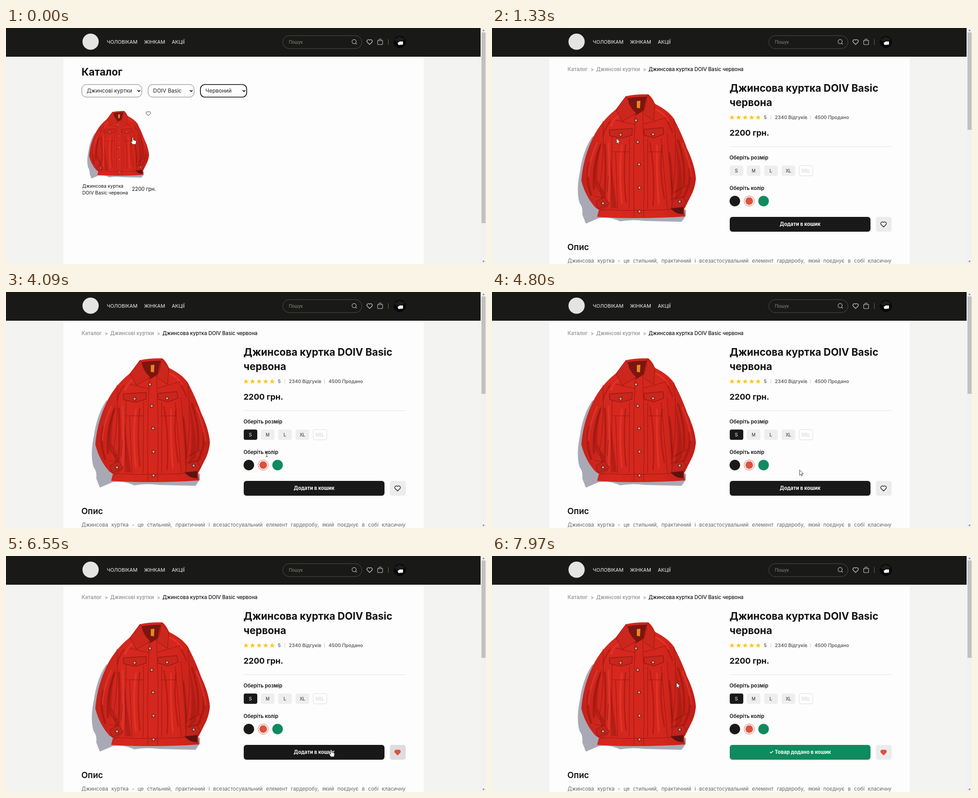
Recreate the animation shown at these times as an HTML page. Size 1064 px wide and 526 px high, loop 8000 ms.

```html
<!DOCTYPE html>
<html lang="uk">
<head>
<meta charset="utf-8">
<title>Каталог</title>
<style>
html, body { margin: 0; width: 100%; height: 100%; overflow: hidden; background: #f3f3f2; }
svg { display: block; width: 100vw; height: 100vh; }
text { font-family: Inter, sans-serif; fill: #111; white-space: pre; }
.nav text { font-size: 11px; fill: #f4f4f4; }
.icon { fill: none; stroke: #c9c9c9; stroke-width: 1.1; }
.select rect { fill: #fdfdfd; stroke: #77777a; height: 28px; rx: 10px; }
.select text { font-size: 12px; fill: #222; }
.select path { fill: none; stroke: #000; stroke-width: 1.7; }
.h1 { font-size: 22.4px; font-weight: 700; }
.crumb { font-size: 11.2px; font-weight: 600; }
.muted { fill: #999; }
.rating text { font-size: 10.5px; font-weight: 600; fill: #606060; }
.label { font-size: 11.3px; font-weight: 600; }
.size rect { width: 30px; height: 23px; rx: 4px; fill: #eee; }
.size text { font: 10px "Liberation Sans", Arial, sans-serif; text-anchor: middle; fill: #222; }
.button { font-size: 11.1px; font-weight: 700; text-anchor: middle; fill: #fff; }
.about { font: 11.5px/17px Inter, sans-serif; color: #666; text-align-last: justify; }
.seam { fill: none; stroke: #8f1a13; stroke-width: 1; }
.fold { fill: none; stroke: #8c120c; stroke-linecap: round; opacity: .45; }
.sheen { fill: none; stroke: #ef4436; stroke-linecap: round; opacity: .45; }
</style>
</head>
<body>
<svg viewBox="0 0 1064 526" preserveAspectRatio="none">
  <defs>
    <path id="heart" d="M0 5L-4.6 .4A2.95 2.95 0 0 1 0-3.2A2.95 2.95 0 0 1 4.6 .4Z"/>
    <path id="star" d="M0-5.5 1.6-1.9 5.4-1.6 2.5 .9 3.4 4.7 0 2.6-3.4 4.7-2.5 .9-5.4-1.6-1.6-1.9Z" fill="#ffc51c"/>
    <g id="stud"><circle r="3.8" fill="#6c1511"/><circle r="2.4" fill="#c9a9a0"/></g>
    <linearGradient id="cloth">
      <stop offset="0" stop-color="#c4221a"/><stop offset=".25" stop-color="#d6281e"/>
      <stop offset=".7" stop-color="#d4261c"/><stop offset="1" stop-color="#be2018"/>
    </linearGradient>
    <g id="jacket">
      <path fill="#a9a9b6" d="M224 240Q202 270 195 320Q186 362 194 390Q202 400 200 415L208 436 236 424Q262 420 284 431Q310 426 340 430L420 432 430 418V405H240Z"/>
      <path fill="url(#cloth)" d="M297 152Q322 147 347 148Q357 157 361 169Q391 184 403 202Q420 234 432 268Q450 306 452 336Q450 358 440 376L426 404 428 420Q330 427 233 421L237 405 230 401Q207 376 198 340Q202 286 228 236Q246 204 275 181Z"/>
      <path fill="#a01a13" opacity=".6" d="M244 250Q230 310 234 350L248 379 228 350Q220 300 244 250ZM406 250Q424 310 421 370L404 386Q418 330 406 250ZM244 350L252 398 240 402ZM262 285L277 402H266Z"/>
      <g class="fold" stroke-width="5">
        <path d="M240 262Q222 310 226 358M216 300Q206 335 220 372M412 250Q430 300 425 350M438 315Q442 345 425 376M250 260Q254 320 249 378M393 280Q400 330 399 372"/>
        <path stroke-width="3" d="M262 208Q250 222 247 240M296 260Q290 320 297 388M350 256Q362 320 357 396M377 262Q370 310 382 380M234 342L244 366M404 366L430 352M385 200L400 232"/>
      </g>
      <g class="sheen" stroke-width="4">
        <path d="M233 256Q214 300 214 330M422 258Q438 296 442 330M258 256Q262 320 258 392M288 262Q280 320 288 390M366 262Q364 330 370 392M280 196Q268 206 264 218M364 182Q382 190 390 206"/>
      </g>
      <path fill="#7d1510" d="M301 156Q323 153 343 153L336 184 320 194 303 173Z"/>
      <path fill="#e38a25" d="M321 163L329 162 328 179 321 178Z"/>
      <path fill="#cc271d" stroke="#8f170e" d="M297 152L275 182 289 208 320 190Q304 176 301 157ZM345 149L361 169 358 206 333 189Q343 174 343 155Z"/>
      <path class="seam" d="M318 192Q312 290 315 422M334 192Q339 300 336 422M246 207Q249 290 239 350L243 380M403 202Q413 300 397 385M240 405Q330 409 424 403M273 205L319 216M337 214L386 200M266 242L264 404M274 278L279 404M305 244L304 404M345 246V404M375 246L389 404M388 235L400 382M266 276H305M344 276H377M258 330L255 366M397 332L400 362M228 375L252 380 257 397 240 407M397 380L422 376"/>
      <path fill="#c9261c" stroke="#7c130d" d="M260 227L311 224 310 239 286 246 261 240ZM337 226L379 222 381 237 358 245 337 239Z"/>
      <path fill="#5f120e" d="M396 402Q408 392 424 397L424 415Q408 416 396 402Z"/>
      <path fill="#c2241b" stroke="#84160f" d="M400 383L424 377 431 390 424 399 398 402ZM230 387L250 377 260 392 236 404Z"/>
      <use href="#stud" x="285" y="238"/><use href="#stud" x="357" y="237"/><use href="#stud" x="319" y="206"/>
      <use href="#stud" x="323" y="254"/><use href="#stud" x="326" y="304"/><use href="#stud" x="327" y="356"/>
      <use href="#stud" x="327" y="409"/><use href="#stud" x="246" y="391"/><use href="#stud" x="416" y="387"/>
    </g>
    <clipPath id="round"><circle cx="873" cy="31" r="13.5"/></clipPath>
  </defs>

  <rect width="1064" height="526" fill="#f3f3f2"/>
  <rect x="127" width="799" height="526" fill="#fdfdfd"/>

  <g class="nav">
    <rect width="1052" height="64" fill="#191917"/>
    <circle cx="187.5" cy="30.5" r="18" fill="#e4e4e4"/>
    <text x="223.5" y="35.3">ЧОЛОВІКАМ</text><text x="306" y="35.3">ЖІНКАМ</text><text x="367.5" y="35.3">АКЦІЇ</text>
    <rect x="613.5" y="17" width="175.5" height="29" rx="14.5" fill="none" stroke="#50504a"/>
    <text x="627" y="35" style="font:10.2px 'Liberation Sans',Arial,sans-serif;fill:#858580">Пошук</text>
    <g class="icon">
      <circle cx="771.7" cy="30.3" r="4.7"/><path d="M775 34L777.5 36.5"/>
      <use href="#heart" transform="translate(806 30.8) scale(1.2)"/>
      <path d="M823.8 28H834.8V35Q834.8 37 832.5 37H826Q823.8 37 823.8 35ZM826.3 28Q826.3 24.5 829.3 24.5T832.3 28"/>
      <path d="M847.5 25V37.5" stroke="#66665f"/>
    </g>
    <g clip-path="url(#round)">
      <rect x="859" y="17" width="28" height="28" fill="#080808"/>
      <path d="M860 26L872 19 884 24 880 29 866 30Z" fill="#1d1d20"/>
      <path d="M868 33L873 30H880V37L870 38Z" fill="#f1f1f1"/>
    </g>
  </g>

  <g id="catalog">
    <text class="h1" x="167.5" y="106.3">Каталог</text>
    <g class="select">
      <rect x="168" y="126" width="133"/><text x="179" y="144.3">Джинсові куртки</text><path d="M291.5 138.5l3 3 3-3"/>
      <rect x="315" y="126" width="102"/><text x="326" y="144.3">DOIV Basic</text><path d="M407.5 138.5l3 3 3-3"/>
      <rect id="colorFilter" x="431" y="126" width="102.5"/><text x="442" y="144.3">Червоний</text><path d="M524.5 138.5l3 3 3-3"/>
    </g>
    <g id="card">
      <rect id="cardBack" x="168" y="174.5" width="164" height="164" rx="9" fill="#e4e4e6"/>
      <use href="#jacket" transform="translate(168 174.5) scale(.523) translate(-167 -128)"/>
      <use href="#heart" x="315.5" y="190.5" fill="none" stroke="#333"/>
      <g font-size="10.5"><text x="169" y="356.3">Джинсова куртка</text><text x="169" y="371">DOIV Basic червона</text></g>
      <text x="279" y="363" font-size="11.4">2200 грн.</text>
    </g>
  </g>

  <g id="product">
    <g class="crumb">
      <text class="muted" x="167.5" y="95.6">Каталог</text><text class="muted" x="218.5" y="95.6">&gt;</text>
      <text class="muted" x="231" y="95.6">Джинсові куртки</text><text class="muted" x="334.5" y="95.6">&gt;</text>
      <text x="347" y="95.6" font-weight="500">Джинсова куртка DOIV Basic червона</text>
    </g>
    <use href="#jacket"/>
    <text class="h1" x="526.5" y="142.3">Джинсова куртка DOIV Basic</text>
    <text class="h1" x="526.5" y="174.3">червона</text>
    <g class="rating">
      <use href="#star" x="532" y="199.5"/><use href="#star" x="546.5" y="199.5"/><use href="#star" x="561" y="199.5"/>
      <use href="#star" x="575.5" y="199.5"/><use href="#star" x="590" y="199.5"/>
      <text x="602.5" y="203">5</text><text x="627" y="203">2340 Відгуків</text><text x="715" y="203">4500 Продано</text>
      <path d="M618 194V204M706 194V204" stroke="#c4c4c4"/>
    </g>
    <text x="526.5" y="240" font-size="18" font-weight="700">2200 грн.</text>
    <path d="M527 264.5H886" stroke="#e2e2de"/>
    <text class="label" x="526.5" y="293">Оберіть розмір</text>
    <g class="size">
      <rect id="sizeS" x="527" y="306.5"/><text id="sizeSText" x="541.5" y="321.5">S</text>
      <rect x="565" y="306.5"/><text x="580" y="321.5">M</text>
      <rect x="603.5" y="306.5"/><text x="618" y="321.5">L</text>
      <rect x="642" y="306.5"/><text x="657" y="321.5">XL</text>
      <rect x="681" y="306.5" style="fill:none;stroke:#dcdce2"/><text x="695.5" y="321.5" style="fill:#cbcbd2">XXL</text>
    </g>
    <text class="label" x="526.5" y="361">Оберіть колір</text>
    <circle cx="538.3" cy="385.7" r="11.7" fill="#191917"/>
    <circle cx="570.2" cy="385.7" r="11.3" fill="none" stroke="#d9604f"/><circle cx="570.2" cy="385.7" r="8.5" fill="#db5340"/>
    <circle cx="602" cy="385.7" r="11.7" fill="#108a5f"/>
    <rect id="add" x="527" y="421" width="312" height="33" rx="6"/>
    <text id="addText" class="button" x="683" y="441.2"></text>
    <rect id="like" x="851" y="421" width="35" height="33" rx="5"/>
    <use id="likeHeart" href="#heart" transform="translate(868 437.3) scale(1.25)"/>
    <text x="167" y="495.3" font-size="18.7" font-weight="600">Опис</text>
    <foreignObject x="167.5" y="511" width="718" height="17">
      <div class="about">Джинсова куртка - це стильний, практичний і всезастосувальний елемент гардеробу, який поєднує в собі класичну</div>
    </foreignObject>
  </g>

  <g>
    <rect x="1052" width="12" height="526" fill="#f1f1f1"/>
    <rect id="thumb" x="1054" y="10" width="9" fill="#c1c1c1"/>
    <path d="M1056 6.5l2.5-3 2.5 3ZM1056 519l2.5 3 2.5-3Z" fill="#707070"/>
  </g>
  <g id="status">
    <path d="M0 512.5H106Q109 512.5 109 515.5V526H0Z" fill="#202124"/>
    <text x="3" y="522" style="font:7.15px 'Open Sans',sans-serif;fill:#e8e8e8">localhost:3000/catalog/2-red</text>
  </g>
  <g id="cursor" stroke="#222" stroke-width=".9" stroke-linejoin="round">
    <path id="arrow" fill="#fff" d="M0 0V12L2.8 9.4 4.6 13.4 6.3 12.6 4.6 8.7H8.3Z"/>
    <path id="hand" fill="#fff" d="M-1.3 .6Q0-1.2 1.4 .6V5.6L6 6.8Q8.1 7.6 7.8 10.2L6.5 15.5H-.3L-4.4 9.6Q-3.5 7.6-1.3 9.6Z"/>
    <path id="ibeam" fill="none" d="M-2.5-5H2.5M0-5V5M-2.5 5H2.5"/>
  </g>
</svg>

<script>
const LOOP = 8000, PAGE_OPEN = 950, LIKED = 6050, ADDED = 7050;
const el = id => document.getElementById(id);
const clamp = x => Math.max(0, Math.min(1, x));
const ease = x => x * x * (3 - 2 * x);
const ramp = (t, start, length = 250) => ease(clamp((t - start) / length));
const mix = (a, b, k) => `rgb(${a.map((v, i) => Math.round(v + (b[i] - v) * k))})`;
const gray = v => [v, v, v];
const show = (id, on) => { el(id).style.display = on ? '' : 'none'; };
const inside = ([x, y], [left, top, right, bottom]) => x >= left && x <= right && y >= top && y <= bottom;

// time, x, y of the pointer tip
const route = [
  [0, 281, 244], [500, 276, 246], [1500, 276, 246], [2350, 460, 283], [2600, 460, 283],
  [3100, 541, 317], [3600, 541, 317], [4050, 578, 362], [4300, 578, 362], [5300, 785, 431],
  [5560, 785, 431], [5860, 867, 435], [6350, 867, 435], [6550, 720.5, 432],
  [6750, 692, 434], [7200, 692, 434], [7900, 409, 282], [LOOP, 409, 282]
];
const clickable = [[527, 306, 672, 330], [526, 374, 614, 398], [527, 420, 839, 454], [851, 420, 886, 454]];
const selectable = [[527, 282, 614, 297], [527, 349, 606, 365], [527, 124, 860, 180]];

function pointerAt(t) {
  const i = route.findIndex(p => p[0] > t);
  const [t0, x0, y0] = route[i - 1], [t1, x1, y1] = route[i];
  const k = ease((t - t0) / (t1 - t0));
  return [x0 + (x1 - x0) * k, y0 + (y1 - y0) * k];
}

function drawCatalog(t) {
  const hover = ramp(t, 60, 300);
  el('card').setAttribute('transform', `translate(250.5 275) scale(${1 + .05 * hover}) translate(-250.5 -275)`);
  el('cardBack').setAttribute('opacity', hover);
  const focused = t < 760;
  el('colorFilter').style.stroke = focused ? '#000' : '';
  el('colorFilter').style.strokeWidth = focused ? 1.6 : 1;
}

function drawProduct(t) {
  const picked = ramp(t, 3350);
  el('sizeS').style.fill = mix(gray(238), gray(25), picked);
  el('sizeSText').style.fill = mix(gray(34), gray(255), picked);

  const added = t >= ADDED;
  const addHover = ramp(t, 5130) - ramp(t, 5700) + ramp(t, 6500);
  el('add').style.fill = added ? mix(gray(25), [16, 138, 95], ramp(t, ADDED, 200)) : mix(gray(25), gray(15), addHover);
  el('addText').style.fill = added ? '#fff' : mix(gray(255), gray(190), addHover);
  el('addText').textContent = added ? '✓ Товар додано в кошик' : 'Додати в кошик';

  el('like').style.fill = mix(gray(236), gray(212), ramp(t, 5780) - ramp(t, 6450));
  el('likeHeart').style.fill = t >= LIKED ? '#db5340' : 'none';
  el('likeHeart').style.stroke = t >= LIKED ? '#db5340' : '#111';
}

function draw(t) {
  const onProduct = t >= PAGE_OPEN;
  show('catalog', !onProduct);
  show('product', onProduct);
  show('status', t >= 150 && !onProduct);
  el('thumb').setAttribute('height', onProduct ? 217 : 425);
  drawCatalog(t);
  drawProduct(t);

  const tip = pointerAt(t), over = areas => areas.some(area => inside(tip, area));
  const hand = !onProduct || over(clickable);
  const text = !hand && over(selectable);
  el('cursor').setAttribute('transform', `translate(${tip})`);
  show('hand', hand);
  show('ibeam', text);
  show('arrow', !hand && !text);
}

const start = performance.now();
function tick() {
  draw((performance.now() - start) % LOOP);
  requestAnimationFrame(tick);
}
tick();
</script>
</body>
</html>
```
